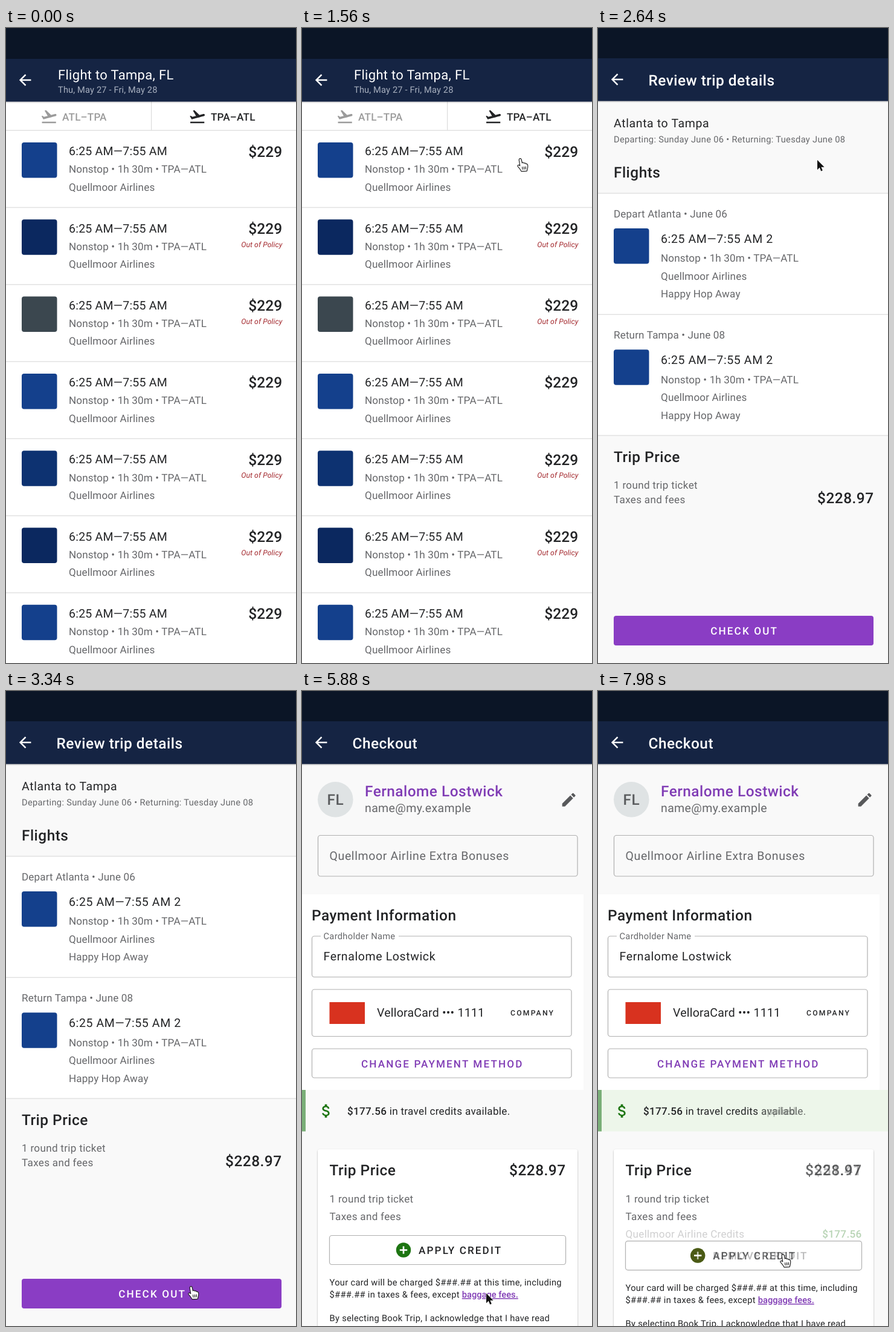
An HTML page that plays this animation: 480 px wide and 1049 px high, repeating every 8000 ms.

```html
<!DOCTYPE html>
<html lang="en">
<head>
<meta charset="utf-8">
<title>Flight booking flow</title>
<style>
  html, body { margin: 0; width: 100%; height: 100%; overflow: hidden; background: #f9f9f9; }
  svg { display: block; width: 100vw; height: 100vh; font-family: Roboto, Arial, sans-serif; text-rendering: geometricPrecision; }
</style>
</head>
<body>
<svg id="stage" viewBox="0 0 480 1049"></svg>
<script>
const LOOP = 8000;
const INK = '#232426', GREY = '#66676a', PURPLE = '#803cb5', GREEN = '#1d7512', LINE = '#b0b0b0';
const AIRLINE = 'Quellmoor', TRAVELLER = 'Fernalome Lostwick';
const ROUTE = 'Nonstop • 1h 30m • TPA—ATL';
const LOGO = { blue: '#14408c', navy: '#0b285f', slate: '#3b474f', royal: '#0d3271' };
const ICON = {
  back: 'M20 11H7.83l5.59-5.59L12 4l-8 8 8 8 1.41-1.41L7.83 13H20v-2z',
  plane: 'M2.5 19h19v2h-19v-2zm19.57-9.36c-.21-.8-1.04-1.28-1.84-1.06L14.92 10l-6.9-6.43-1.93.51 4.14 7.17-4.97 1.33-1.97-1.54-1.45.39 2.59 4.49s7.12-1.9 16.57-4.43c.81-.23 1.28-1.05 1.07-1.85z',
  edit: 'M3 17.25V21h3.75L17.81 9.94l-3.75-3.75L3 17.25zM20.71 7.04c.39-.39.39-1.02 0-1.41l-2.34-2.34c-.39-.39-1.02-.39-1.41 0l-1.83 1.83 3.75 3.75 1.83-1.83z',
  dollar: 'M11.8 10.9c-2.27-.59-3-1.2-3-2.15 0-1.09 1.01-1.85 2.7-1.85 1.78 0 2.44.85 2.5 2.1h2.21c-.07-1.72-1.12-3.3-3.21-3.81V3h-3v2.16c-1.94.42-3.5 1.68-3.5 3.61 0 2.31 1.91 3.46 4.7 4.13 2.5.6 3 1.48 3 2.41 0 .69-.49 1.79-2.7 1.79-2.06 0-2.87-.92-2.98-2.1h-2.2c.12 2.19 1.76 3.42 3.68 3.83V21h3v-2.15c1.95-.37 3.5-1.5 3.5-3.55 0-2.84-2.43-3.81-4.7-4.4z'
};

// Text styles: [size, letter spacing, weight, extra attributes]
const STYLE = {
  title: [24.43, .47, 500], price: [24.43, .18, 500], bar: [22, .3, 400],
  lead: [19.54, .21, 400], wide: [19.54, .6, 400], mid: [19.54, .35, 400],
  body: [17.1, .14, 400], loose: [17.1, .3, 400], strong: [17.1, .3, 500],
  tab: [17.1, .2, 500], button: [17.1, 2.14, 500], tag: [12.2, 2.2, 500],
  small: [14.66, .31, 400], date: [14.66, .14, 400],
  policy: [12.2, .1, 400, 'font-style="italic"']
};

const text = (x, y, style, str, fill = INK, anchor = 'start') => {
  const [size, gap, weight, extra = ''] = STYLE[style];
  return `<text x="${x}" y="${y}" font-size="${size}" letter-spacing="${gap}" font-weight="${weight}" fill="${fill}" text-anchor="${anchor}" ${extra}>${str}</text>`;
};
const rect = (x, y, w, h, fill, extra = '') =>
  `<rect x="${x}" y="${y}" width="${w}" height="${h}" fill="${fill}" ${extra}/>`;
const outline = (x, y, w, h) => rect(x + .5, y + .5, w, h, '#fff', `fill-opacity="0" stroke="${LINE}" stroke-width="1.2" rx="4"`);
const icon = (name, x, y, fill) =>
  `<path transform="translate(${x} ${y}) scale(1.2214)" d="${ICON[name]}" fill="${fill}"/>`;
const logo = (y, colour) => rect(26, y, 58.5, 58.5, colour, 'rx="4"');
const rule = y => rect(0, y, 480, 1.4, '#e0e0e0');
const header = (y, content) =>
  rect(0, 0, 480, y + 1, '#0b1526') + rect(0, y, 480, 70.7, '#152443') +
  rect(0, y + 70.7, 480, 3, 'url(#shade)') + icon('back', 17, y + 20.4, '#fff') + content;

function listScreen() {
  const rows = [['blue'], ['navy', 1], ['slate', 1], ['blue'], ['royal', 1], ['navy', 1], ['blue']];
  return rect(0, 0, 480, 1049, '#fff') +
    rect(240, 121, 1.2, 48, '#dcdcdc') +
    header(51, text(86, 84.5, 'bar', 'Flight to Tampa, FL', '#fff') +
      text(86, 107, 'date', 'Thu, May 27 - Fri, May 28', '#a9b1c0')) +
    icon('plane', 56.5, 131.5, '#9b9b9b') + text(93, 153, 'tab', 'ATL–TPA', '#9b9b9b') +
    icon('plane', 302, 131.5, INK) + text(339, 153, 'tab', 'TPA–ATL') +
    rows.map(([colour, flagged], i) => {
      const y = 169 + i * 127.3;
      return rule(y - .5) + logo(y + 20, LOGO[colour]) +
        text(104, y + 41.2, 'lead', '6:25 AM—7:55 AM') +
        text(104, y + 70.3, 'body', ROUTE, GREY) +
        text(104, y + 99.8, 'body', AIRLINE + ' Airlines', GREY) +
        text(457.4, y + 43.5, 'price', '$229', INK, 'end') +
        (flagged ? text(457.5, y + 65.2, 'policy', 'Out of Policy', '#a3282d', 'end') : '');
    }).join('');
}

function leg(y, label) {
  return rect(0, y, 480, 200, '#fff') + rule(y - .7) +
    text(26, y + 40, 'body', label, GREY) + logo(y + 58, LOGO.blue) +
    text(104, y + 82, 'wide', '6:25 AM—7:55 AM 2') +
    [ROUTE, AIRLINE + ' Airlines', 'Happy Hop Away']
      .map((s, i) => text(104, y + 113.3 + i * 29.5, 'body', s, GREY)).join('');
}

function reviewScreen() {
  return rect(0, 0, 480, 1049, '#f9f9f9') +
    header(50, text(83.5, 94.6, 'title', 'Review trip details', '#fff')) +
    text(26, 164, 'wide', 'Atlanta to Tampa') +
    text(26, 189, 'small', 'Departing: Sunday June 06 • Returning: Tuesday June 08', GREY) +
    text(26, 247, 'title', 'Flights') +
    leg(273, 'Depart Atlanta • June 06') + leg(473.3, 'Return Tampa • June 08') + rule(672.5) +
    text(26, 716.5, 'title', 'Trip Price') +
    text(26, 761, 'loose', '1 round trip ticket', GREY) + text(26, 785, 'loose', 'Taxes and fees', GREY) +
    text(456.5, 784.7, 'title', '$228.97', INK, 'end') +
    rect(26, 971, 430, 49, '#8a3dc4', 'rx="4"') + text(186.2, 1002, 'button', 'CHECK OUT', '#fff');
}

function checkoutScreen() {
  const credit = '<tspan font-weight="500">$177.56</tspan> in travel credits ';
  return rect(0, 0, 480, 1049, '#f9f9f9') +
    header(50, text(83.5, 94.6, 'title', 'Checkout', '#fff')) +
    `<circle cx="55.3" cy="179.3" r="29.3" fill="#dfe3e4"/>` +
    text(55.3, 188, 'title', 'FL', '#595b5d', 'middle') +
    text(104, 173.5, 'title', TRAVELLER, PURPLE) +
    text(104, 200, 'mid', 'name@my.example', GREY) + icon('edit', 427, 165, '#58595b') +
    outline(26, 238, 429.5, 67.5) + text(45.5, 278.5, 'wide', AIRLINE + ' Airline Extra Bonuses', GREY) +
    rect(0, 336, 466, 323, '#fff') +
    text(16, 379, 'title', 'Payment Information') +
    outline(16, 404.5, 429.5, 67.5) + rect(31, 400, 129, 9, '#fff') +
    text(35.5, 409.5, 'small', 'Cardholder Name', GREY) +
    text(35.5, 445, 'wide', TRAVELLER) +
    outline(16, 492.5, 429.5, 77.5) + rect(45.5, 514, 58.5, 36, '#d8321f') +
    text(124, 538, 'lead', 'VelloraCard ••• 1111') + text(345, 536, 'tag', 'COMPANY') +
    outline(16, 590.5, 429.5, 48) + text(98, 621.5, 'button', 'CHANGE PAYMENT METHOD', PURPLE) +
    `<g class="new">${rect(0, 659, 480, 68.5, '#d3efc8')}</g>` +
    rect(0, 659, 6, 68.5, '#7aaf78') + icon('dollar', 25.5, 679, GREEN) +
    text(75, 699.5, 'loose', `${credit}<tspan class="old">available.</tspan>`) +
    text(75, 699.5, 'loose', `<tspan fill-opacity="0">${credit}</tspan><tspan class="new">applied.</tspan>`) +
    rect(26, 757, 430, 310, '#fff', 'rx="4" filter="url(#lift)"') +
    text(45.5, 800, 'title', 'Trip Price') +
    `<g class="old">${text(436.5, 800, 'title', '$228.97', INK, 'end')}</g>` +
    `<g class="new">${text(436.5, 800, 'title', '$51.41', INK, 'end')}</g>` +
    text(45.5, 844.5, 'loose', '1 round trip ticket', GREY) + text(45.5, 874, 'loose', 'Taxes and fees', GREY) +
    `<g class="new">${text(45.5, 903, 'loose', AIRLINE + ' Airline Credits', GREY)}` +
    `${text(436.5, 903, 'strong', '$177.56', GREEN, 'end')}</g>` +
    `<g id="lower">${rect(45.5, 899.5, 391, 48, '#fff', `stroke="${LINE}" stroke-width="1.2" rx="4"`)}` +
    `<g id="action"><circle cx="168" cy="923.5" r="12.2" fill="${GREEN}"/>` +
    `<g class="new"><circle cx="168" cy="923.5" r="12.2" fill="#b3201c"/></g>` +
    rect(161.8, 922.2, 12.4, 2.6, '#fff') + `<g class="old">${rect(166.7, 917.3, 2.6, 12.4, '#fff')}</g>` +
    `<g class="old">${text(193, 929.5, 'button', 'APPLY CREDIT')}</g>` +
    `<g class="new">${text(193, 929.5, 'button', 'REMOVE CREDIT')}</g></g>` +
    text(45.5, 982, 'small', 'Your card will be charged $###.## at this time, including') +
    text(45.5, 1002, 'small', `$###.## in taxes &amp; fees, except <tspan fill="${PURPLE}" font-weight="500" letter-spacing="0" text-decoration="underline">baggage fees.</tspan>`) +
    text(45.5, 1041, 'small', 'By selecting Book Trip, I acknowledge that I have read') + '</g>';
}

const cursorShapes = `
  <path id="arrow" d="M0 0V16.2L3.8 12.6L6.2 18.4L8.8 17.3L6.4 11.7H11.6Z" fill="#111" stroke="#fff" stroke-width="1.2" paint-order="stroke"/>
  <g id="hand" stroke="#222" stroke-width="1.2" stroke-linecap="round" stroke-linejoin="round">
    <path fill="#fff" d="M-2.8 1C-3-2 .8-2 1.2.5L2.4 6C3 4.8 5 5 5.5 6.5C6.5 5.6 8.2 6 8.6 7.5C10 6.8 11.4 8 11.7 10C12.2 14 11 16 10.2 19.3L1 19.8C-.5 16.5-3 14-4.8 11.8C-6 9.5-3.5 8.3-1.3 10.6Z"/>
    <path fill="none" d="M2.6 12.5L3 16.5M5.5 12.3L5.7 16.3M8.3 12L8.3 16"/>
  </g>`;

const stage = document.getElementById('stage');
stage.innerHTML = `
  <defs>
    <linearGradient id="shade" x2="0" y2="1">
      <stop stop-color="#000" stop-opacity=".2"/><stop offset="1" stop-color="#000" stop-opacity="0"/>
    </linearGradient>
    <filter id="lift" x="-5%" y="-5%" width="110%" height="110%">
      <feDropShadow dx="0" dy="1" stdDeviation="1.2" flood-opacity=".35"/>
    </filter>
  </defs>
  <g>${listScreen()}</g>
  <g id="review">${reviewScreen()}</g>
  <g id="checkout">${checkoutScreen()}</g>
  <g id="cursor">${cursorShapes}</g>`;

const part = id => document.getElementById(id);
const [review, checkout, lower, action, cursor, arrow, hand] =
  ['review', 'checkout', 'lower', 'action', 'cursor', 'arrow', 'hand'].map(part);
const leaving = stage.querySelectorAll('.old'), entering = stage.querySelectorAll('.new');

const progress = (t, start, length) => Math.min(1, Math.max(0, (t - start) / length));
const easeOut = p => 1 - (1 - p) ** 1.65;
const smooth = p => p * p * (3 - 2 * p);

const REVIEW_AT = 1900, CHECKOUT_AT = 3480, CREDIT_AT = 7920, FADE = 300;
// Cursor moves: start, duration, destination
const MOVES = [
  [1000, 450, 362, 217], [1700, 150, 363, 218], [2700, 600, 307, 985],
  [4500, 300, 305, 995], [6200, 550, 307, 932]
];

function cursorAt(t) {
  let x = 492, y = 320;
  for (const [start, length, toX, toY] of MOVES) {
    const p = smooth(progress(t, start, length));
    x += (toX - x) * p;
    y += (toY - y) * p;
  }
  return [x, y];
}

function isClickable(t, y) {
  if (t < REVIEW_AT + FADE / 2) return true;
  if (t < CHECKOUT_AT + FADE / 2) return y > 971 && y < 1020;
  return y > 899 && y < 948;
}

function fade(el, amount) {
  el.style.display = amount > 0 ? '' : 'none';
  el.setAttribute('opacity', amount);
}

function draw(t) {
  fade(review, easeOut(progress(t, REVIEW_AT, FADE)));
  fade(checkout, easeOut(progress(t, CHECKOUT_AT, FADE)));

  const p = easeOut(progress(t, CREDIT_AT, FADE));
  leaving.forEach(el => el.setAttribute('fill-opacity', 1 - p));
  entering.forEach(el => el.setAttribute('fill-opacity', p));
  lower.setAttribute('transform', `translate(0 ${29 * p})`);
  action.setAttribute('transform', `translate(${-9 * p} 0)`);

  const [x, y] = cursorAt(t);
  const clickable = isClickable(t, y);
  cursor.setAttribute('transform', `translate(${x} ${y})`);
  hand.style.display = clickable ? '' : 'none';
  arrow.style.display = clickable ? 'none' : '';
}

const begin = performance.now();
function tick() {
  draw((performance.now() - begin) % LOOP);
  requestAnimationFrame(tick);
}
tick();
</script>
</body>
</html>
```
